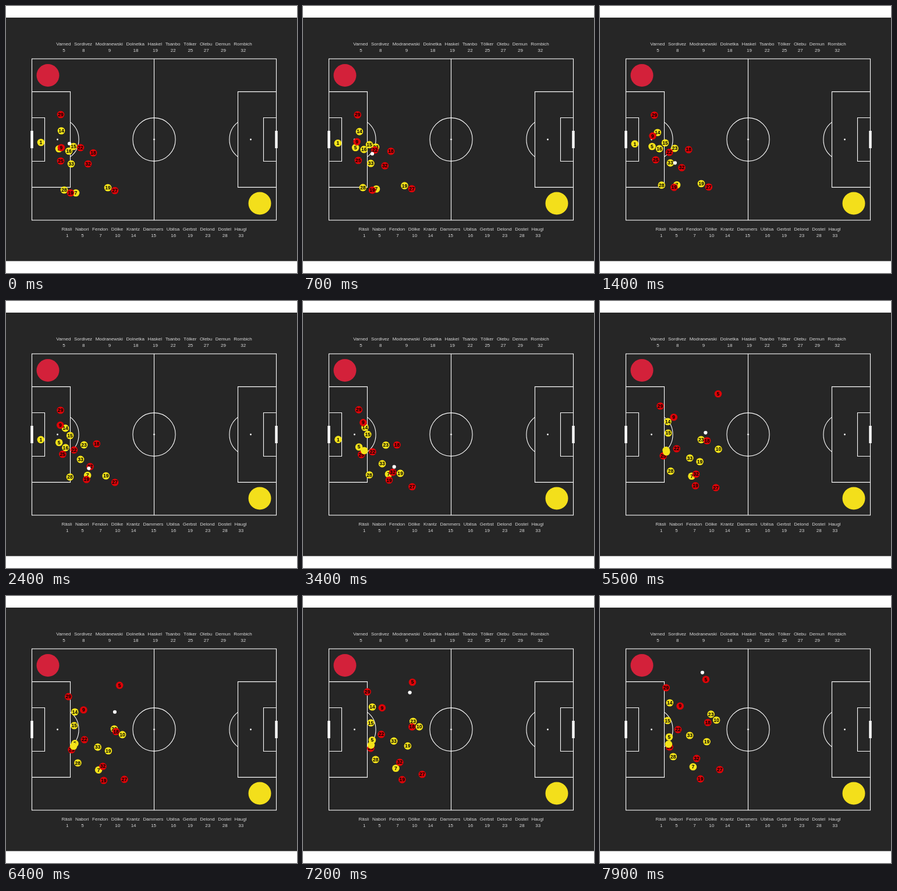
Write an HTML page that moves like this. It is 500 px wide and 460 px high and loops after 8 s.

```html
<!DOCTYPE html>
<html lang="en">
<head>
<meta charset="utf-8">
<title>Match tracking</title>
<style>
html, body { margin: 0; width: 100%; height: 100%; overflow: hidden; background: #fff; }
svg { display: block; width: 100%; height: 100%; }
text { font-family: "Liberation Sans", Arial, sans-serif; font-size: 8px; }
.roster { fill: #d9d9d9; }
.player text { font-size: 8.6px; font-weight: bold; fill: #000; }
.player text, .centered { text-anchor: middle; }
.lines { fill: none; stroke: #fff; stroke-width: 1.1; }
</style>
</head>
<body>
<svg id="stage" viewBox="0 0 500 460"></svg>
<script>
const LOOP = 8000, STEP = 100;
const CENTER = { x: 254.5, y: 230 };
const PITCH = { width: 420, height: 278 };
const METER = { x: PITCH.width / 105, y: PITCH.height / 68 };
const stage = document.getElementById('stage');

function add(tag, attrs = {}, parent = stage, content = '') {
  const node = document.createElementNS('http://www.w3.org/2000/svg', tag);
  for (const name in attrs) node.setAttribute(name, attrs[name]);
  node.textContent = content;
  parent.append(node);
  return node;
}

function drawPitch() {
  add('rect', { y: 20, width: 500, height: 419.5, fill: '#262626' });
  const lines = add('g', { class: 'lines' });
  const top = CENTER.y - PITCH.height / 2;
  const rx = 9.15 * METER.x, ry = 9.15 * METER.y;
  add('rect', { x: CENTER.x - PITCH.width / 2, y: top, ...PITCH }, lines);
  add('path', { d: `M${CENTER.x} ${top}v${PITCH.height}` }, lines);
  add('ellipse', { cx: CENTER.x, cy: CENTER.y, rx, ry }, lines);
  add('circle', { cx: CENTER.x, cy: CENTER.y, r: 1.4, fill: '#fff' });

  for (const side of [-1, 1]) {
    const goalLine = CENTER.x + side * PITCH.width / 2;
    const inward = meters => goalLine - side * meters * METER.x;
    const area = (depth, width) => {
      const half = width / 2 * METER.y;
      add('path', { d: `M${goalLine} ${CENTER.y - half}H${inward(depth)}v${2 * half}H${goalLine}` }, lines);
    };
    area(16.5, 40.32);
    area(5.5, 18.32);
    const chord = Math.sqrt(9.15 ** 2 - 5.5 ** 2) * METER.y;
    add('path', {
      d: `M${inward(16.5)} ${CENTER.y - chord}a${rx} ${ry} 0 0 ${side < 0 ? 1 : 0} 0 ${2 * chord}`
    }, lines);
    add('circle', { cx: inward(11), cy: CENTER.y, r: 1.4, fill: '#fff' });
    add('rect', { x: goalLine - 2.2, y: CENTER.y - 15, width: 4.4, height: 30, fill: '#fff' });
  }
  add('circle', { cx: 72, cy: 119.5, r: 19.5, fill: '#d3213a' });
  add('circle', { cx: 436, cy: 340, r: 19.5, fill: '#f3df1b' });
}

// Names flow with a constant gap, the whole row centred on the pitch.
function drawRoster(y, list) {
  const gap = 5.6;
  const entries = list.split(', ').map(entry => {
    const [name, number] = entry.split(' ');
    const label = add('text', { class: 'roster', y }, stage, name);
    return { label, number, width: label.getComputedTextLength() };
  });
  const total = entries.reduce((sum, { width }) => sum + width + gap, -gap);
  let x = CENTER.x - total / 2;
  for (const { label, number, width } of entries) {
    label.setAttribute('x', x);
    add('text', { class: 'roster centered', x: x + width / 2 + 0.7, y: y + 11.3 }, stage, number);
    x += width + gap;
  }
}

drawPitch();
drawRoster(68, 'Varned 5, Sordivez 8, Modranewski 9, Dolnetka 18, Haskel 19, '
  + 'Tsanbo 22, Tölker 25, Olebu 27, Demun 29, Rombich 32');
drawRoster(386.7, 'Räsli 1, Nabori 5, Fendon 7, Dölke 10, Krantz 14, Dammers 15, '
  + 'Ubilsa 16, Gerbst 19, Delond 23, Dostel 28, Haugl 33');

const movers = [];

// Waypoints are spaced evenly in time over the mover's visible span.
function track(node, waypoints, { from = 0, to = LOOP } = {}) {
  const points = waypoints.split(' ').map(pair => pair.split(',').map(Number));
  movers.push({ node, points, from, to });
}

function player(color, number, waypoints, span) {
  const group = add('g', { class: 'player' });
  add('circle', { r: 6.3, fill: color }, group);
  add('text', { y: 3 }, group, number);
  track(group, waypoints, span);
}
const yellow = (...args) => player('#f5e31a', ...args);
const red = (...args) => player('#dd0408', ...args);

yellow(1, '60,235 60,239 63,235', { to: 5500 });
yellow(5, '91,246 90,242 100,255 117,256 119,242');
yellow(7, '120,322 142,299 157,302 160,294');
yellow(10, '214,285 201,246 200,212', { from: 4000 });
yellow(14, '95,215 103,219 116,209 120,183');
yellow(15, '116,242 110,231 117,228 116,214');
yellow(16, '108,250 102,246 103,257', { to: 2900 });
yellow(19, '175,313 173,303 166,293 174,271 184,250');
yellow(23, '125,243 135,248 153,246 184,232 191,202', { from: 700 });
yellow(28, '100,317 111,302 121,294 126,276');
yellow(33, '112,272 125,271 141,282 157,265 154,239');

red(5, '203,160 181,143', { from: 5500 });
red(9, '95,244 91,217 110,207 131,198 138,189');
red(18, '150,253 154,246 166,248 188,237 185,217');
red(19, '111,322 141,307 163,318 173,315');
red(22, '128,244 117,255 122,260 134,251 134,229');
red(25, '94,267 98,264 108,267 120,260');
red(27, '187,318 187,311 189,323 202,319 206,298');
red(29, '94,187 94,188 103,182 114,157');
red(32, '141,272 142,282 159,299 166,296 166,279');

yellow('', '103,257 114,260 118,255', { from: 2900 });
track(add('circle', { r: 3.1, fill: '#fff' }),
  '109,237 128,269 146,290 165,275 180,232 187,190 175,127');

// Catmull-Rom curve through the waypoints, straight-ended.
function positionAt({ points, from, to }, time) {
  const last = points.length - 1;
  const progress = (time - from) / (to - from) * last;
  const i = Math.min(Math.floor(progress), last - 1);
  const u = progress - i, v = 1 - u;
  return [0, 1].map(axis => {
    const p = k => points[k][axis];
    const slope = k => {
      const a = Math.max(k - 1, 0), b = Math.min(k + 1, last);
      return (p(b) - p(a)) / (b - a);
    };
    return v * v * (1 + 2 * u) * p(i) + u * u * (1 + 2 * v) * p(i + 1)
      + u * v * (v * slope(i) - u * slope(i + 1));
  });
}

function render(time) {
  for (const mover of movers) {
    const visible = time >= mover.from && time < mover.to;
    mover.node.setAttribute('display', visible ? 'inline' : 'none');
    if (visible) mover.node.setAttribute('transform', `translate(${positionAt(mover, time)})`);
  }
}

const start = performance.now();
function tick() {
  const elapsed = (performance.now() - start) % LOOP;
  render(Math.floor(elapsed / STEP) * STEP);
  requestAnimationFrame(tick);
}
tick();
</script>
</body>
</html>
```
